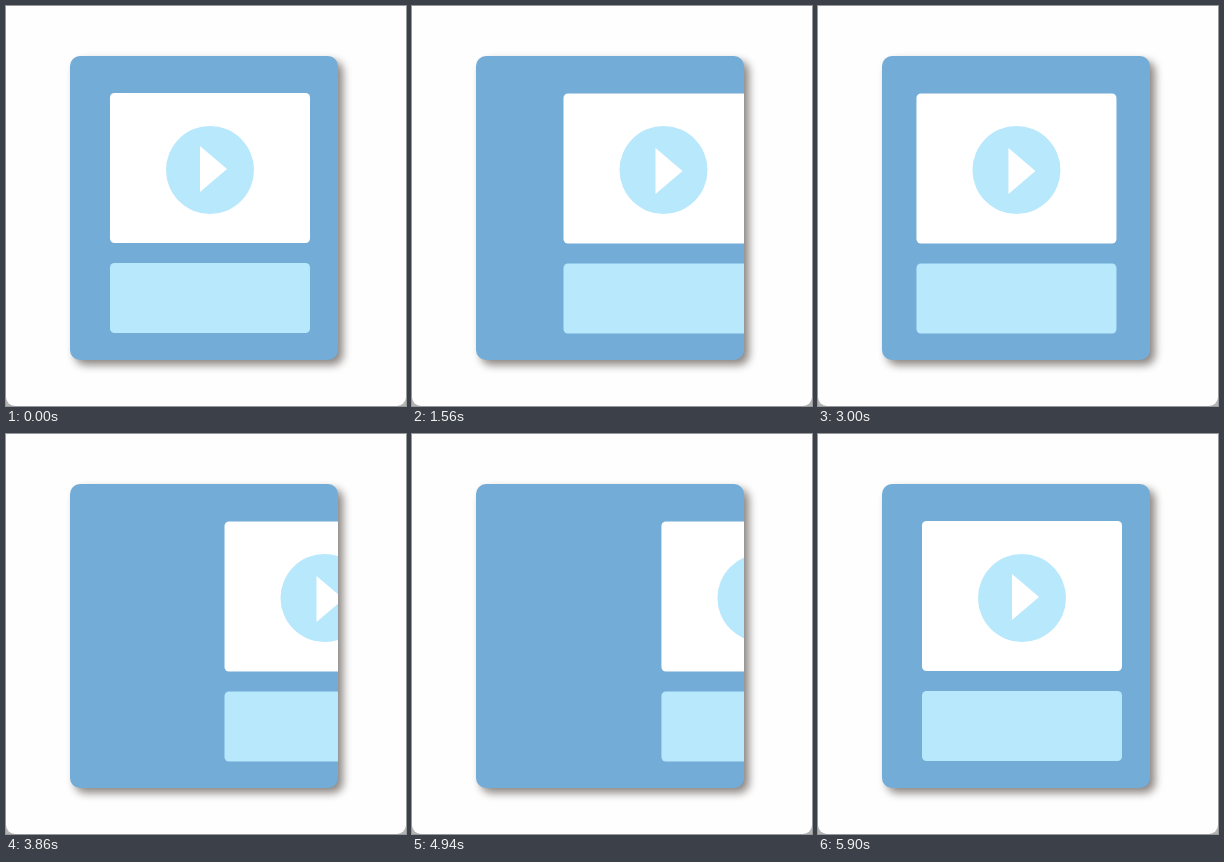
An HTML page that plays this animation: 400x400 px, repeating every 6.04 s.

```html
<!DOCTYPE html>
<html lang="en">
<head>
<meta charset="utf-8">
<title>Card swipe</title>
<style>
  html, body { margin: 0; width: 100%; height: 100%; overflow: hidden; background: #b4b4b4; }
  #page { position: absolute; left: 0; top: 0; width: 400px; height: 400px; background: #fefefe; border-radius: 0 0 9px 9px; }
  #panel {
    position: absolute; left: 64px; top: 50px; width: 268px; height: 304px;
    overflow: hidden; border-radius: 10px; background: #73acd7;
    box-shadow: 5px 5px 8px #8b8683;
  }
  svg { display: block; }
</style>
</head>
<body>
<div id="page">
  <div id="panel">
    <svg width="268" height="304" viewBox="64 50 268 304">
      <g id="strip"></g>
    </svg>
  </div>
</div>
<script>
const LOOP = 6040, STEP = 20, PITCH = 400;
const strip = document.getElementById('strip');

// x, y: box offset; tx, ty: play triangle offset
const card = (x, y, tx, ty) => `
  <g transform="translate(${x})">
    <rect x="104" y="${87 + y}" width="200" height="150" rx="4.5" fill="#fff"/>
    <rect x="104" y="${257 + y}" width="200" height="70" rx="4.5" fill="#b8e8fc"/>
    <circle cx="204" cy="164" r="44" fill="#b8e8fc"/>
    <path d="M${194 + tx} ${140 + ty}l27 23l-27 23z" fill="#fff"/>
  </g>`;

strip.innerHTML = card(0, 0, 0, 0) + card(PITCH - 6, .5, 2, 2) + card(2 * PITCH - 6, .5, 2, 2);

// shown: first visible movement; start, drag, glide: timing in ms; dir: pages moved
const swipes = [
  { shown: 1200, start: 1131, drag: 240, glide: 760, dir: 1 },
  { shown: 2231, start: 2231, drag: 300, glide: 670, dir: 1 },
  { shown: 3800, start: 3768, drag: 60, glide: 840, dir: -1 },
  { shown: 4720, start: 4720, drag: 244, glide: 700, dir: -1 }
];

// Accelerating drag, then a quintic glide that continues at the same speed
function progress(time, { shown, start, drag, glide }) {
  const t = time - start;
  if (time < shown) return 0;
  if (t >= drag + glide) return 1;
  const part = 5 * drag / (5 * drag + 2 * glide);
  if (t < drag) return part * (t / drag) ** 2;
  return 1 - (1 - part) * (1 - (t - drag) / glide) ** 5;
}

function draw(now) {
  const time = Math.floor(now % LOOP / STEP) * STEP;
  const page = swipes.reduce((sum, s) => sum + s.dir * progress(time, s), 0);
  strip.setAttribute('transform', `translate(${-page * PITCH})`);
  requestAnimationFrame(draw);
}
draw(performance.now());
</script>
</body>
</html>
```
